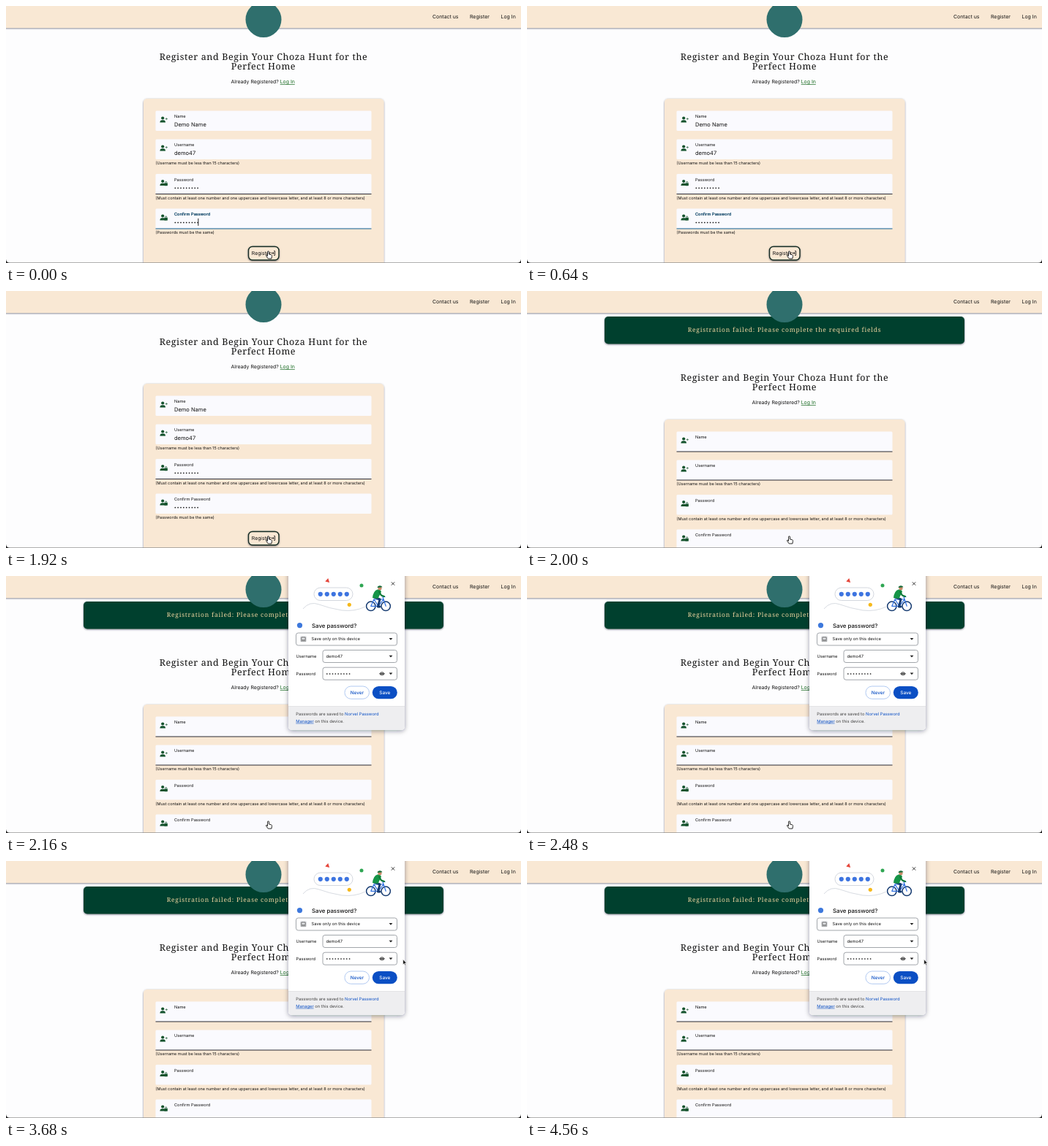
Animation of 704x352 px, one loop 4.64 s. Source, as an HTML page:

```html
<!DOCTYPE html>
<html lang="en">
<head>
<meta charset="utf-8">
<title>Registration form</title>
<style>
  html, body { margin: 0; height: 100%; overflow: hidden; background: #fdfdfe; }
  svg { display: block; width: 704px; height: 352px; }
  text { font-family: Inter, "Open Sans", sans-serif; fill: #111; text-rendering: geometricPrecision; white-space: pre; }
  .serif { font-family: "Noto Serif", serif; }
  .mid { text-anchor: middle; }
  .bold { font-weight: 500; }
  .icon { fill: #14532d; }
  .dots { stroke: #111; stroke-width: 1.7; stroke-linecap: round; stroke-dasharray: 0 3.85; }
  .box { fill: #fff; stroke: #8b9096; stroke-width: .8; }
  .outline { fill: none; stroke: #d3d7de; stroke-width: .9; }
  .limb { fill: none; stroke-linecap: round; stroke-linejoin: round; }
</style>
</head>
<body>
<svg id="stage" viewBox="0 0 704 352"></svg>
<script>
const LOOP = 4640, BLUR = 1640, SUBMITTED = 2000, POPUP = 2080;
const MOVE_START = 2640, MOVE_END = 3120, BANNER_SHIFT = 49;
const CREAM = '#f9e8d4', BLUE = '#0b4fc4', LINK = '#16691f';
const fieldTops = [143.5, 182.5, 230, 277.5];

const text = (x, y, size, str, attrs = '') =>
  `<text x="${x}" y="${y}" font-size="${size}" ${attrs}>${str}</text>`;
const rect = (x, y, w, h, r, attrs) =>
  `<rect x="${x}" y="${y}" width="${w}" height="${h}" rx="${r}" ${attrs}/>`;
const circle = (x, y, r, attrs) => `<circle cx="${x}" cy="${y}" r="${r}" ${attrs}/>`;
const path = (d, attrs) => `<path d="${d}" ${attrs}/>`;
const group = (id, body, attrs = '') => `<g id="${id}" ${attrs}>${body}</g>`;
const dots = (x, y) => path(`M${x} ${y}h31`, 'class="dots"');
const caretDown = (x, y) => path(`M${x - 2.4} ${y - 1.2}h4.8l-2.4 2.6z`, 'fill="#222"');
const underline = (top, color) => rect(204.5, top + 27, 295, 1, 0, `fill="${color}"`);

const person = (x, y) => circle(x + 3.2, y + 2.2, 2.1, 'class="icon"') +
  path(`M${x - .6} ${y + 8.3}q0-3.4 3.4-3.4h1q3.2 0 3.2 3.4z`, 'class="icon"');
const plus = (x, y) => path(`M${x + 6.6} ${y + 3.3}h3.4m-1.7-1.6v3.2`, 'stroke="#14532d" stroke-width=".6"');
const lock = (x, y) => rect(x + 5.5, y + 4.6, 4.4, 3.8, .6, 'class="icon"') +
  path(`M${x + 6.6} ${y + 5}v-1.2a1.1 1.1 0 0 1 2.2 0v1.2`, 'fill="none" stroke="#14532d" stroke-width=".8"');

function field(top, label, hint, secret) {
  const x = 211, y = top + 7.8;
  return rect(204.5, top, 295, 27.5, 1.5, 'fill="#fafafe"') +
    person(x, y) + (secret ? lock : plus)(x, y) +
    text(230, top + 9.7, 5.65, label) +
    text(204.5, top + 34.7, 5.53, hint);
}

const navBar = rect(-5, -5, 714, 35, 0, `fill="${CREAM}" filter="url(#shadow)"`) +
  text(583, 16.7, 6.95, 'Contact us') + text(634, 16.7, 6.95, 'Register') + text(676.5, 16.7, 6.95, 'Log In') +
  circle(352, 18.5, 24.5, 'fill="#2f6f6d"');

const banner = rect(106, 35, 492, 37.5, 5, 'fill="#04402f" filter="url(#shadow)"') +
  text(352, 56.4, 8.5, 'Registration failed: Please complete the required fields',
    'class="serif mid" letter-spacing=".78" style="fill:#f0d5a0"');

const heading = 'class="serif mid" letter-spacing=".62"';
const form = text(352, 73.7, 12.5, 'Register and Begin Your Choza Hunt for the', heading) +
  text(352, 87.2, 12.5, 'Perfect Home', heading) +
  text(307.5, 106.2, 6.9, `Already Registered? <tspan fill="${LINK}" text-decoration="underline">Log In</tspan>`) +
  rect(188, 127, 328.5, 300, 5, `fill="${CREAM}" filter="url(#shadow)"`) +
  field(fieldTops[0], 'Name', '') +
  field(fieldTops[1], 'Username', '(Username must be less than 15 characters)') +
  field(fieldTops[2], 'Password', '(Must contain at least one number and one uppercase and lowercase letter, and at least 8 or more characters)', true) +
  field(fieldTops[3], 'Confirm Password', '(Passwords must be the same)', true) +
  group('filled', text(230, 164.9, 7.5, 'Demo Name') + text(230, 203.9, 7.5, 'demo47') +
    dots(231.3, 249.3) + dots(231.3, 296.6) + underline(fieldTops[2], '#2b2b33')) +
  group('emptied', underline(fieldTops[0], '#2b2b33') + underline(fieldTops[1], '#2b2b33')) +
  group('focus', underline(fieldTops[3], '#0f5f92') +
    text(230, 287.2, 5.65, 'Confirm Password', 'style="fill:#0f6296"')) +
  rect(262.4, 291, .9, 10, 0, 'id="caret" fill="#111"') +
  rect(331.5, 329.5, 41.5, 18.5, 5.5, `fill="${CREAM}" stroke="#152c23" stroke-width="1.4" filter="url(#shadow)"`) +
  text(335.8, 340.8, 6.9, 'Register') +
  path('M362.5 338.5h3.6m-1.4-1.6 1.6 1.6-1.6 1.6M366 335.6h1.6v5.8h-1.6', 'fill="none" stroke="#111" stroke-width=".8"');

const cyclist =
  [498.8, 519.2].map(x => circle(x, 41.3, 6.2, 'fill="#fff" stroke="#153a70" stroke-width="1.5"')).join('') +
  path('M498.8 41.3 503 32h13l-7 9.3h-10.200M503 32l6 9.300M519.2 41.3 515 28.500h3', 'class="limb" stroke="#2f6fe0" stroke-width="1.2"') +
  path('M503.500 29 511 32l-2.500 10h2.500', 'class="limb" stroke="#153a70" stroke-width="3"') +
  path('M501 30q1-10 7-11.500 4-.5 5 3l-4.500 9.500z', 'fill="#159447"') +
  path('M510 21.500 513 26.500l4 1.500', 'class="limb" stroke="#0d7a38" stroke-width="2.2"') +
  circle(511, 16.8, 2.6, 'fill="#c98a68"') +
  path('M507.500 16a3.700 3.500 0 0 1 7-.8z', 'fill="#176b3a"');

const illustration =
  path('M406 45q9-11 22-6t31 8q18 2 32-5', 'class="outline"') +
  rect(421, 16, 53, 17.5, 8.7, 'fill="#fff" stroke="#d3d7de"') +
  [0, 1, 2, 3, 4].map(i => circle(429.8 + i * 9, 24.8, 3.1, 'fill="#3d74e0"')).join('') +
  path('M436.300 7.500 440.300 3l1.900 6z', 'fill="#e5473c"') +
  circle(486, 13, 2.5, 'fill="#2fa653"') + circle(469.3, 39.3, 2.6, 'fill="#f6b91c"') + cyclist;

const popup = rect(386, -20, 159, 231, 5, 'fill="#fff" filter="url(#lift)"') +
  path('M386 178.500h159v27.500a5 5 0 0 1-5 5h-149a5 5 0 0 1-5-5z', 'fill="#eeeef0"') +
  path('M386 178.500h159', 'stroke="#dcdde0" stroke-width=".7"') + illustration +
  path('M526.800 8.300l4.400 4.400m0-4.400-4.400 4.400', 'stroke="#222" stroke-width=".9"') +
  circle(401.5, 67.6, 3.6, 'fill="#3d78dc"') +
  text(418, 70.5, 7.85, 'Save password?', 'class="bold"') +
  rect(396.500, 78, 138, 17, 3, 'class="box"') +
  rect(402, 82, 9, 8.5, 2, 'fill="#dfe1e4"') +
  path('M403.800 84h5.400v3.700h-5.400zM403 89h7', 'fill="none" stroke="#555" stroke-width=".8"') +
  text(417.5, 88.4, 5.8, 'Save only on this device') + caretDown(526, 86.3) +
  text(396.500, 112, 5.75, 'Username') + rect(433, 101.500, 101.500, 17, 3, 'class="box"') +
  text(437.500, 112, 5.8, 'demo47') + caretDown(526, 110) +
  text(396.500, 135.700, 5.75, 'Password') + rect(433, 125.200, 101.500, 17, 3, 'class="box"') +
  dots(438.800, 134) + caretDown(526, 133.800) +
  path('M510.300 133.700q3.700-5 7.400 0-3.700 5-7.400 0', 'fill="#222"') +
  circle(514, 133.7, 1.5, 'fill="#222" stroke="#fff" stroke-width=".7"') +
  rect(463, 151, 33.500, 17.300, 8.6, 'fill="#fff" stroke="#a9c3f0" stroke-width=".9"') +
  text(479.800, 162, 6.4, 'Never', `class="bold mid" style="fill:${BLUE}"`) +
  rect(500.800, 151, 34, 17.300, 8.6, `fill="${BLUE}"`) +
  text(517.800, 162, 6.4, 'Save', 'class="bold mid" style="fill:#fff"') +
  text(396.300, 190.900, 5.8, `Passwords are saved to <tspan fill="${BLUE}">Norvel Password</tspan>`, 'style="fill:#444"') +
  text(396.300, 200.700, 5.8, `<tspan fill="${BLUE}" text-decoration="underline">Manager</tspan> on this device.`, 'style="fill:#444"');

const pointers =
  group('hand', path('M-1.500 1.500v-5.500q0-1.200 1-1.200t1 1.200v3l3 .7q1.200.4 1 1.800l-.6 3.500h-4.600l-2.600-3.600q-.6-1 .3-1.200 1 0 1.500 1.300z',
    'fill="#fff" stroke="#111" stroke-width=".9" stroke-linejoin="round"')) +
  group('beam', path('M-1.500-4q1.500 0 1.500 1v6q0 1-1.500 1M1.500-4q-1.500 0-1.500 1M0 3q0 1 1.500 1', 'fill="none" stroke="#111" stroke-width=".8"')) +
  group('arrow', path('M-1.300-4.200v7l1.600-1.400 1.200 2.700 1.100-.5-1.200-2.600h2.100z', 'fill="#111" stroke="#fff" stroke-width=".6"'));

const shadow = (id, dy, blur, opacity) => `<filter id="${id}" x="-20%" y="-30%" width="140%" height="160%">
  <feDropShadow dx="0" dy="${dy}" stdDeviation="${blur}" flood-color="#101828" flood-opacity="${opacity}"/></filter>`;

const stage = document.getElementById('stage');
stage.innerHTML = `<defs>${shadow('shadow', .8, 1, .55)}${shadow('lift', 1.5, 3, .4)}</defs>` +
  rect(0, 0, 704, 352, 0, 'fill="#fdfdfe"') + group('form', form) + group('banner', banner) + navBar +
  group('popup', popup) +
  rect(0, 351.3, 704, .7, 0, 'fill="#8f8f8f"') +
  path('M0 346.500v5.500h5.500a5.500 5.500 0 0 1-5.500-5.500M704 346.500v5.500h-5.500a5.500 5.500 0 0 0 5.500-5.500', 'fill="#222"') +
  group('pointer', pointers);

const el = id => document.getElementById(id);
const show = (id, on) => el(id).setAttribute('opacity', Number(on));
const clamp = v => Math.min(1, Math.max(0, v));
const bezier = (a, b, c, u) => (1 - u) ** 2 * a + 2 * u * (1 - u) * b + u * u * c;

function pointerKind(x, y, u) {
  if (u === 0) return 'hand';
  const overPopup = x > 386 && x < 545 && y < 211;
  const overField = x > 204 && x < 500 &&
    fieldTops.some(top => y > top + BANNER_SHIFT && y < top + BANNER_SHIFT + 28);
  return overField && !overPopup ? 'beam' : 'arrow';
}

function draw(t) {
  const submitted = t >= SUBMITTED;
  el('form').setAttribute('transform', `translate(0 ${submitted ? BANNER_SHIFT : 0})`);
  show('filled', !submitted);
  show('emptied', submitted);
  show('banner', submitted);
  show('popup', t >= POPUP);
  show('focus', 1 - clamp((t - BLUR) / 200));
  show('caret', t < BLUR && (t + 340) % 1000 < 500);

  const p = clamp((t - MOVE_START) / (MOVE_END - MOVE_START));
  const u = p * p * (3 - 2 * p);
  const x = bezier(359, 416.5, 544, u), y = bezier(341, 234, 139, u);
  el('pointer').setAttribute('transform', `translate(${x} ${y})`);
  const kind = pointerKind(x, y, u);
  for (const id of ['hand', 'beam', 'arrow']) show(id, id === kind);
}

const start = performance.now();
function tick() {
  draw((performance.now() - start) % LOOP);
  requestAnimationFrame(tick);
}
tick();
</script>
</body>
</html>
```
